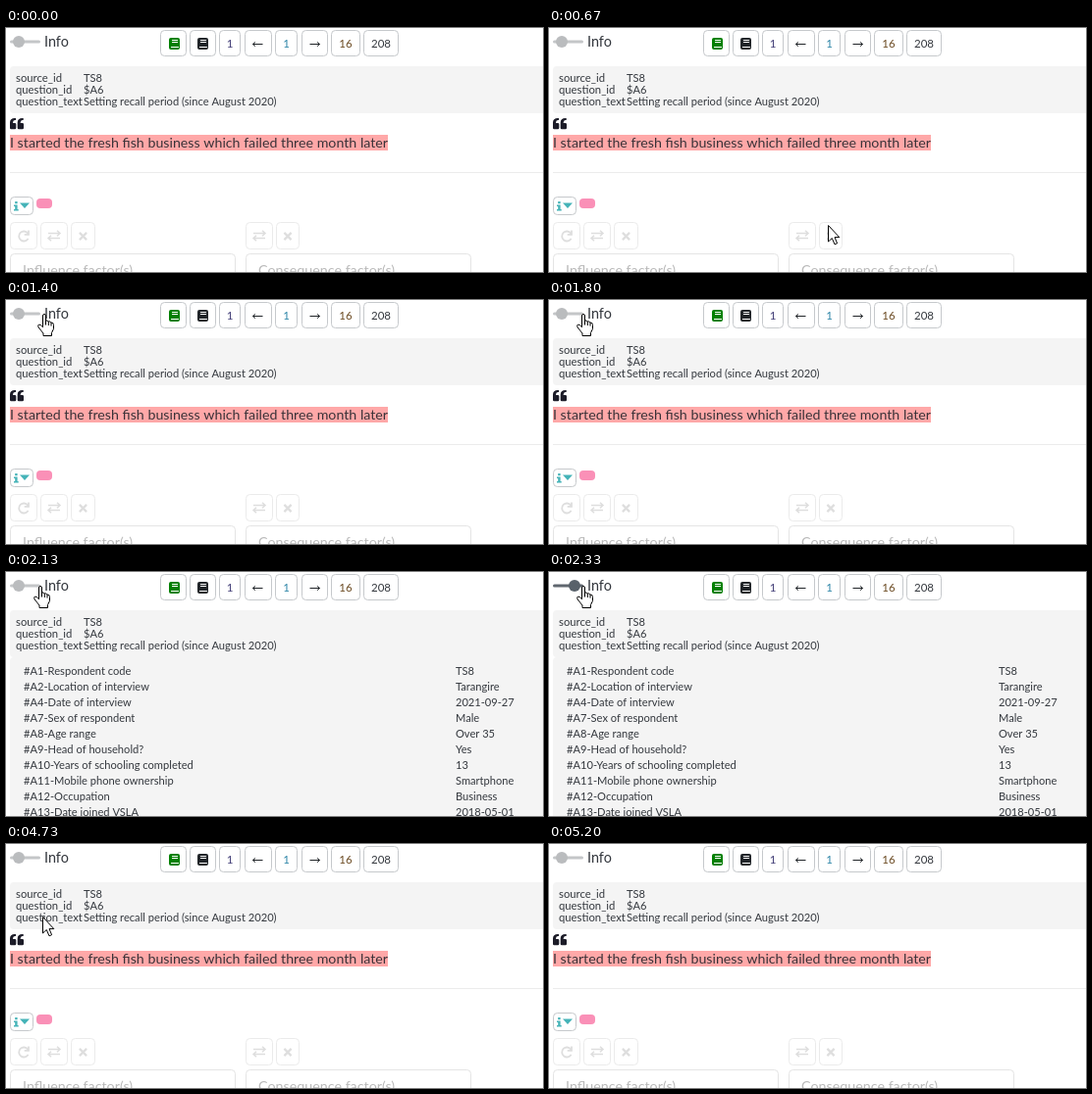
An HTML page with a canvas that plays this animation: 547x249 px, repeating every 5.74 s.

```html
<!DOCTYPE html>
<html lang="en">
<head>
<meta charset="utf-8">
<title>Info toggle</title>
<style>
  html, body { margin: 0; width: 100%; height: 100%; overflow: hidden; background: #fff; }
  canvas { display: block; width: 547px; height: 249px; }
</style>
</head>
<body>
<canvas id="stage"></canvas>
<script>
const W = 547, H = 249, LOOP = 5740, FPS = 15;
const INK = '#212529', SOFT = '#34383e', PANEL = '#f4f4f4', FAINT = '#dedede', TEAL = '#45b3b8';
const canvas = document.getElementById('stage');
const ctx = canvas.getContext('2d');
const ratio = window.devicePixelRatio || 1;
canvas.width = W * ratio;
canvas.height = H * ratio;

const meta = [
  ['source_id', 'TS8'],
  ['question_id', '$A6'],
  ['question_text', 'Setting recall period (since August 2020)']
];
const details = [
  ['#A1-Respondent code', 'TS8'],
  ['#A2-Location of interview', 'Tarangire'],
  ['#A4-Date of interview', '2021-09-27'],
  ['#A7-Sex of respondent', 'Male'],
  ['#A8-Age range', 'Over 35'],
  ['#A9-Head of household?', 'Yes'],
  ['#A10-Years of schooling completed', '13'],
  ['#A11-Mobile phone ownership', 'Smartphone'],
  ['#A12-Occupation', 'Business'],
  ['#A13-Date joined VSLA', '2018-05-01']
];

const arrow = new Path2D('M.5 .5V17L4.3 13.5L7 19.8L9.6 18.7L7 12.6H11.8Z');
const hand = new Path2D('M5.5 2Q5.5 .5 7 .5Q8.5 .5 8.5 2V7Q10.4 6.4 11.2 8Q13 7.3 13.9 9Q16.5 8.7 16.5 11.5V15.5L14.5 19.5V22.5H6V20L1.2 14Q0 11.7 1.4 11.1Q3 10.5 5.5 13.7Z');
const knuckles = new Path2D('M8.5 7V11.5M11.3 8V12M14 9V12.5');
const quoteMark = new Path2D('M6 0V2H5Q3 2 3 4.5V5H5Q6.3 5 6.3 6.3V10Q6.3 11.3 5 11.3H1.3Q0 11.3 0 10V4.5Q0 0 5 0Z');
const infoMark = new Path2D('M1.2 0H3.6V2.3H1.2ZM0 3.5H3.6V8H4.7V9.6H0V8H1.2V5.1H0Z');

const clamp = v => Math.max(0, Math.min(1, v));
const mix = (a, b, k) => a + (b - a) * k;

function text(str, x, y, size, color = SOFT, align = 'left') {
  ctx.font = `${size}px Lato, "Open Sans", sans-serif`;
  ctx.textAlign = align;
  ctx.fillStyle = color;
  ctx.fillText(str, x, y);
}

function box(x, y, w, h, r, fill, stroke) {
  ctx.beginPath();
  ctx.roundRect(x, y, w, h, r);
  if (fill) { ctx.fillStyle = fill; ctx.fill(); }
  if (stroke) { ctx.strokeStyle = stroke; ctx.lineWidth = 1; ctx.stroke(); }
}

// Strokes or fills path data with its origin at x, y.
function shape(path, x, y, { fill, stroke, width = 1 } = {}) {
  const p = typeof path === 'string' ? new Path2D(path) : path;
  ctx.save();
  ctx.translate(x, y);
  if (fill) { ctx.fillStyle = fill; ctx.fill(p); }
  if (stroke) { ctx.strokeStyle = stroke; ctx.lineWidth = width; ctx.stroke(p); }
  ctx.restore();
}

const button = (x, y, w, h, border = '#c6c9cc') => box(x + .5, y + .5, w - 1, h - 1, 4, '#fff', border);

function book(x, color) {
  box(x, 10, 11, 12, 2, color);
  ctx.fillStyle = '#fff';
  ctx.fillRect(x + 3, 12, 6, 1);
  ctx.fillRect(x + 3, 14, 6, 1);
  ctx.fillRect(x + 2, 19, 8, 1);
}

function toolbar() {
  for (const [x, w] of [[157, 27], [187, 27], [217, 22], [243, 28], [274, 23], [301, 27], [331, 30], [364, 36]])
    button(x, 2, w, 27);
  book(166, '#008000');
  book(195, INK);
  text('1', 228, 20, 11.5, '#46427a', 'center');
  text('1', 285.5, 20, 11.5, '#2f86a8', 'center');
  text('16', 346, 20, 11.5, '#6b4a22', 'center');
  text('208', 382, 20, 11.5, SOFT, 'center');
  const line = { stroke: INK };
  shape('M10 0H0M2.5 -2.2L0 0L2.5 2.2', 251.5, 16.5, line);
  shape('M0 0H10M7.5 -2.2L10 0L7.5 2.2', 309.5, 16.5, line);
}

function toggle(k) {
  const tone = (off, on) => `rgb(${off.map((v, i) => Math.round(mix(v, on[i], k)))})`;
  box(4, 12.5, 31, 3, 1.5, tone([196, 198, 200], [96, 103, 111]));
  ctx.beginPath();
  ctx.arc(mix(13, 26, k), 14, 6, 0, Math.PI * 2);
  ctx.fillStyle = tone([186, 188, 190], [88, 97, 106]);
  ctx.fill();
  text('Info', 39, 19, 14.4);
}

function header() {
  box(4, 39, 550, 48, 4, PANEL);
  meta.forEach(([key, value], i) => {
    text(key, 10, 55 + 12 * i, 11.3);
    text(value, 79, 55 + 12 * i, 11.15);
  });
}

function infoTable() {
  box(4, 87, 550, 180, 4, PANEL);
  details.forEach(([key, value], i) => {
    text(key, 18, 105 + 16 * i, 11.15);
    text(value, 458, 105 + 16 * i, 11.1);
  });
}

function swap(x) {
  shape('M0 3H12M9 .2L12 3L9 5.8M12 8H0M3 5.2L0 8L3 10.8', x, 206.5, { stroke: FAINT, width: 1.5 });
}

function cross(x) {
  shape('M-3.6 -3.6L3.6 3.6M3.6 -3.6L-3.6 3.6', x, 212.5, { stroke: FAINT, width: 2.2 });
}

function factorForm(x, label) {
  button(x, 230, 230, 40, '#e4e4e4');
  text(label, x + 13, 252, 14.3, '#bababa');
}

function statement() {
  shape(quoteMark, 4, 92, { fill: '#1c1c28' });
  shape(quoteMark, 11.7, 92, { fill: '#1c1c28' });
  ctx.fillStyle = '#ffa8a8';
  ctx.fillRect(4, 109, 385, 16);
  text('I started the fresh fish business which failed three month later', 4, 122, 14.23, '#3a3238');
  ctx.fillStyle = '#ececec';
  ctx.fillRect(4, 147, W, 1);

  button(4, 172, 24, 19);
  shape(infoMark, 8, 177, { fill: TEAL });
  shape('M0 0H10L5 5.5Z', 14, 178.5, { fill: TEAL });
  box(31, 174, 16, 10, 4, '#fa90b7');

  for (const [x, w] of [[4, 28], [35, 28], [66, 25], [244, 28], [275, 24]])
    button(x, 198, w, 28, '#ebebeb');
  shape('M4.2 -3A5 5 0 1 0 4.6 2.4M5 -6V-1.7H.7', 18, 212.5, { stroke: FAINT, width: 1.8 });
  swap(43);
  swap(252);
  cross(78.5);
  cross(287);
  factorForm(4, 'Influence factor(s)');
  factorForm(244, 'Consequence factor(s)');
}

// Pointer hotspot for a tick, or null while it is off stage.
function pointer(n) {
  if (n < 9 || n > 77) return null;
  if (n <= 17) {
    const k = 1 - Math.pow(1 - (n - 9) / 8, 1.54);
    return [mix(339, 43, k), mix(244, 14, k)];
  }
  if (n < 68) return [43 - 5 * clamp((n - 18) / 3) - 4 * clamp((n - 23) / 4), 14];
  const k = (n - 68) / 9;
  const s = k * k * (3 - 2 * k);
  return [mix(34, 45, s), mix(14, 247, s)];
}

function drawPointer(n) {
  const at = pointer(n);
  if (!at) return;
  const [x, y] = at.map(Math.round);
  const style = { fill: '#fff', stroke: '#000' };
  if (y < 23) {
    shape(hand, x - 6, y, style);
    shape(knuckles, x - 6, y, { stroke: '#000' });
  } else {
    shape(arrow, x, y, style);
  }
}

function draw(now) {
  const n = Math.floor((now % LOOP + 4) * FPS / 1000);
  const open = n >= 32 && n < 68;
  ctx.setTransform(ratio, 0, 0, ratio, 0, 0);
  ctx.fillStyle = '#fff';
  ctx.fillRect(0, 0, W, H);
  toggle(open ? clamp((n - 32) / 3) : n >= 68 ? clamp((71 - n) / 3) * .93 : 0);
  toolbar();
  header();
  open ? infoTable() : statement();
  drawPointer(n);
}

const start = performance.now();
function tick() {
  draw(performance.now() - start);
  requestAnimationFrame(tick);
}
tick();
</script>
</body>
</html>
```
